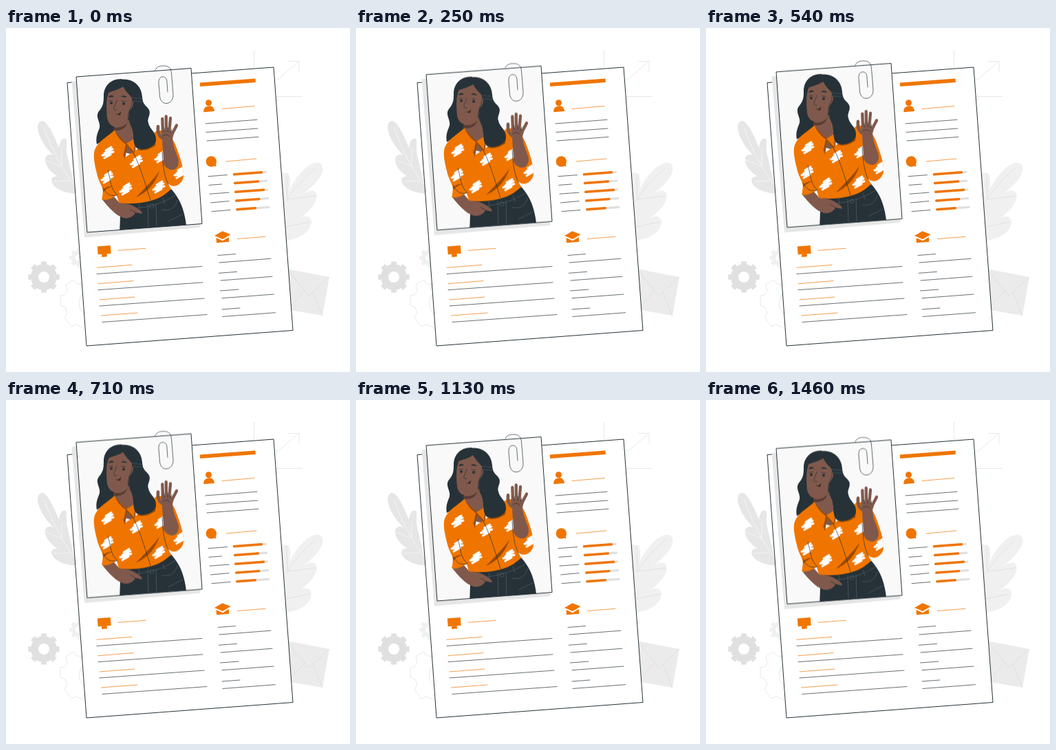
Animation, 500 px wide and 500 px high, one loop 1500 ms. Source, as an HTML page:

```html
<!DOCTYPE html>
<html lang="en">
<head>
<meta charset="utf-8">
<title>Resume</title>
<style>
  html, body { margin: 0; width: 100%; height: 100%; overflow: hidden; background: #fff; }
  svg { display: block; width: 100vw; height: 100vh; }
  .ink { fill: none; stroke: #263238; stroke-width: .7; stroke-linecap: round; stroke-linejoin: round; }
  .orange { fill: #f07500; }
  .accent { fill: none; stroke: #f07500; stroke-width: .7; stroke-linecap: round; }
  .dark { fill: #263238; }
  .skin { fill: #80594c; }
  .shade { fill: #9c4a00; }
  .fingers { fill: none; stroke: #80594c; stroke-linecap: round; stroke-linejoin: round; }
  .pale { fill: none; stroke: #e6e6e6; stroke-width: .9; }
  .photo { animation: float 1.5s linear infinite; }
  @keyframes float { 50% { transform: translateY(-10px); } }
</style>
</head>
<body>
<svg viewBox="0 0 500 500">
  <defs>
    <clipPath id="frame"><path d="M102 71 269 58.5 285 284.5 118 297Z"/></clipPath>
    <path id="shirt" d="M157 149C148 158 134 164 129 177C126 186 129 199 132 211C134 222 140 229 141 237L139.500 249C146 252 154 247 161 243L164 254C181 257 204 254 217 249C226 246 234 240 240 234L235 225C238 229 243 231 248 229C255 226 259 219 258 211C257 198 251 182 246 169C241 157 231 147 219 149L190 177 173 188Z"/>
    <clipPath id="cloth"><use href="#shirt"/></clipPath>
    <path id="brush" d="M5-8 -3-3 7-5 -5 1 8-1 -8 4 4 3 -5 8" fill="none" stroke="#fff" stroke-width="3" stroke-linejoin="round" stroke-linecap="round"/>
  </defs>

  <!-- Backdrop -->
  <path fill="#e6e6e6" d="M102 241C91 240 75 237 68 227C64 220 67 215 75 216C66 210 59 203 57 194C56 186 61 182 69 185C57 174 47 158 46 145C46 135 53 132 58 138C66 147 71 160 77 174C78 163 83 158 88 162V180Z"/>
  <path fill="none" stroke="#f5f5f5" d="M55 145C66 174 82 207 101 231M58 192 80 201M81 177V201M70 223 93 222"/>
  <path fill="#f0f0f0" d="M400 309C424 309 442 298 444 283C445 274 435 270 426 278C444 264 454 251 451 241C449 233 438 236 431 242C449 228 463 213 460 201C456 190 439 198 430 209C423 216 416 226 412 236C414 226 414 216 410 211L400 210Z"/>
  <path fill="none" stroke="#dedede" stroke-width=".8" d="M450 203C432 219 417 235 407 252M408 212 409 249 451 244M407 289 441 282"/>
  <path class="pale" d="M360.500 32V60M360 99.500H431M386 70 395 75 426 48M410 48.500H426V64"/>
  <path fill="#ebebeb" d="M408 350 470 362 460 418 408 409Z"/>
  <path fill="none" stroke="#e0e0e0" d="M409 351 440 389 470 362M410 409 434 382M446 384 460 418"/>
  <g fill="none" stroke="#e0e0e0">
    <circle cx="55" cy="362" r="13.500" stroke-width="11"/>
    <circle cx="55" cy="362" r="20" stroke-width="5.500" pathLength="16" stroke-dasharray="1 1" stroke-dashoffset=".5"/>
  </g>
  <g fill="none" stroke="#f0f0f0">
    <circle cx="106" cy="334" r="8" stroke-width="6"/>
    <circle cx="106" cy="334" r="12" stroke-width="4" pathLength="16" stroke-dasharray="1 1" stroke-dashoffset=".5"/>
  </g>
  <path class="pale" d="M114 373 103 372 98 366 87 373 89 382 85 388 79 389V403L86 406 89 414 85 421 95 434 102 431 111 435 119 441M113 386C104 391 104 410 114 415"/>

  <!-- Page -->
  <path d="M89 79.500 389 57 417 439.500 117 462Z" fill="#fff" stroke="#263238" stroke-width="1"/>
  <path d="M282 82.300 362.700 76.300" stroke="#f07500" stroke-width="5.500"/>
  <g class="orange">
    <circle cx="294.500" cy="108.700" r="4.500"/>
    <path d="M287.300 122.200C287 116 290 113.800 294.800 113.400C299.500 113 302.500 115.500 303 121Z"/>
    <circle cx="298.300" cy="194" r="7.700"/>
    <path d="M300 200 305.500 201.500 304.500 196Z"/>
    <path d="M303 302 314.500 295.300 326.500 300 315 307Z"/>
    <path d="M305.500 305 315 309.300 323.700 304 324.300 310.800 306 312.200Z"/>
    <path d="M132.800 317.500 151.700 316 152.700 327.700 133.700 329.200ZM139 329 146.500 328.300 147 332.200 139.300 332.900Z"/>
  </g>
  <path class="accent" d="M314 117.500 361 113.500M320 194 364 190M336.500 306.500 377 303.300M163 323.300 203 320.300M132 348.300 183 344.300M134 371.700 185 367.500M136 395 187 391M138.500 418 191 414"/>
  <path class="ink" d="M290 139 365 133.300M291 151.500 366 146M292 164 367 158.300
    M294 215.700 321.500 213.600M295 228.400 313.500 227M296 241.200 324 239.100M297.500 254 324 251.600M299 266.700 326 264.500
    M132 357.500 285 346.500M134 380.700 286 369.800M136 404 288 393M140 427.500 292 416.500
    M308 330.500 333.500 328.500M310 341 385 335.200M309.500 356.300 335.500 354.300M312 367 387 361.200M311.500 382 338 380M314 392.700 389 387M314 409 340 407M315 419.500 391.500 413.700"/>
  <g id="skills" fill="none" stroke-width="3.400" stroke-linecap="round"></g>

  <!-- Photo -->
  <g class="photo">
    <path fill="#e6e6e6" d="M95.500 77.500 262 66 282.500 290 114 304.500Z"/>
    <path fill="#f9f9f9" d="M102 71 269 58.500 285 284.500 118 297Z"/>
    <g clip-path="url(#frame)">
      <!-- Hair behind -->
      <path class="dark" d="M168 74C150 74 142 86 142 99C142 109 141 114 135 121C129 129 138 137 136 145C133 153 130 159 132 169L158 154 186 148 180 84Z"/>
      <path class="skin" d="M157 139V150C160 163 166 174 173 181L188 185 190 130Z"/>
      <path fill="#593b32" d="M156 144C166 147 176 141 178 134L174 143C169 149 160 150 156 148Z"/>
      <path class="skin" d="M149 93C145 103 146 121 147 131C149 140 155 145 163 143C171 141 176 136 179 129L185 116 184 98 172 84C163 90 156 91 149 93Z"/>
      <!-- Trousers -->
      <path class="dark" d="M167 252C166 266 166 281 165 299H263C262 278 258 253 240 234C222 247 196 256 167 252Z"/>
      <g fill="none" stroke="#526168" stroke-width=".7">
        <path d="M168 262C193 264 224 258 246 243M206 255 207 292M218 255 219 290M193 255 194 265M228 247 231 256M227 264C239 267 247 260 249 250M236 281 258 270"/>
        <circle cx="212" cy="259" r="3"/>
      </g>
      <!-- Arm on hip -->
      <path class="skin" d="M139 248C146 257 159 273 171 276C180 278 187 272 188 268L197 270C200 268 194 264 189 261C181 255 170 255 164 253L155 243Z"/>
      <path class="ink" stroke-width=".4" d="M181 264 188 268"/>
      <!-- Shirt -->
      <use href="#shirt" class="orange"/>
      <g clip-path="url(#cloth)">
        <use href="#brush" x="148" y="181"/>
        <use href="#brush" x="189.500" y="194"/>
        <use href="#brush" x="174" y="234"/>
        <use href="#brush" x="222" y="231"/>
        <use href="#brush" x="147" y="217"/>
        <use href="#brush" x="225" y="187"/>
        <use href="#brush" x="253" y="210"/>
        <path class="shade" d="M223 208C213 222 202 232 189 246C201 241 215 231 223 208ZM140 236C145 231 149 230 155 230C149 232 145 234 141 239ZM190 176C202 177 211 173 218 163L217 171C207 178 197 180 190 176Z"/>
      </g>
      <path class="shade" d="M157 150 173 191 176 171 186 184 188 174 173 166Z"/>
      <path class="orange" d="M158 149C153 152 155 161 171 184L174 169C166 163 161 157 158 149ZM188 160 186 180 175 168Z"/>
      <path class="ink" d="M186 183C196 203 203 229 210 250M141 232C148 245 154 244 161 243M227 180C228 200 230 216 236 227M148 207C153 223 151 233 162 243"/>
      <!-- Waving arm -->
      <path class="skin" d="M227 158C227 172 229 186 229 196C230 203 238 207 244 206C251 203 252 196 250 189C246 178 242 170 242 158Z"/>
      <!-- Hair in front -->
      <path class="dark" d="M166 75C181 72 194 81 197 94C199 103 197 108 205 115C214 124 204 130 207 138C209 148 219 151 218 163C217 173 201 179 191 175C183 170 187 156 183 145C179 136 177 127 180 119C184 111 185 104 181 99C176 94 172 89 169 83C163 91 154 91 149 94L144 113C140 99 145 78 166 75Z"/>
      <path fill="none" stroke="#526168" stroke-width=".6" d="M182 101 198 103M183 106 198 107"/>
      <path class="skin" d="M181 105C186 104 187 111 180 120Z"/>
      <path class="ink" d="M183 105C185 114 175 122 178 132C180 141 185 145 185 153"/>
      <!-- Hand -->
      <path class="skin" d="M225 150C229 146 239 147 244 152C243 160 241 164 237 167C230 167 226 159 225 150Z"/>
      <path class="fingers" stroke-width="4.300" d="M228 153 227.300 132M233 153 232.700 128.500M237 153 239 131M240 157 248 141.500"/>
      <path class="fingers" stroke-width="4.600" d="M229 161C223 158 220 152 221 143"/>
      <path class="ink" stroke-width=".4" d="M230 151V145M235.300 151V145M239 152 241 147M228 157C232 154 236 155 238 158"/>
      <!-- Face -->
      <g class="dark">
        <circle cx="153" cy="109" r="2"/>
        <circle cx="171" cy="110" r="2"/>
        <path d="M149 101C151 97 155 97 157 100ZM167 100C170 97 174 98 176 101Z"/>
      </g>
      <path class="ink" d="M150 106 155 105M168 106 174 107M161 105C160 111 156 115 157 118C158 120 160 120 161 119M160 125C163 126 166 125 167 122"/>
      <path fill="#3f2821" d="M162 126 167 122 166 127Z"/>
    </g>
    <path d="M102 71 269 58.500 285 284.500 118 297Z" fill="none" stroke="#263238" stroke-width="1"/>
    <path class="ink" d="M217 61C219 56 224 55 229 55C235 55 240 57 240.500 66L243 96C243.500 104 239 109.500 233 109.500C227 109.500 224 105 223.500 99L222 81C221.500 74 224 71 228 71C232 71 234 74 234 80L235 93"/>
  </g>
</svg>
<script>
  const skills = document.getElementById('skills');
  const bar = (x, y, len, color) => {
    const path = document.createElementNS('http://www.w3.org/2000/svg', 'path');
    path.setAttribute('d', `M${x} ${y}l${len} ${-len * 0.075}`);
    path.setAttribute('stroke', color);
    skills.append(path);
  };
  [40, 34, 41, 33, 26.5].forEach((level, i) => {
    const x = 331.5 + 1.1 * i, y = 212.8 + 12.75 * i;
    bar(x, y, 46, '#e0e0e0');
    bar(x, y, level, '#f07500');
  });
</script>
</body>
</html>
```
